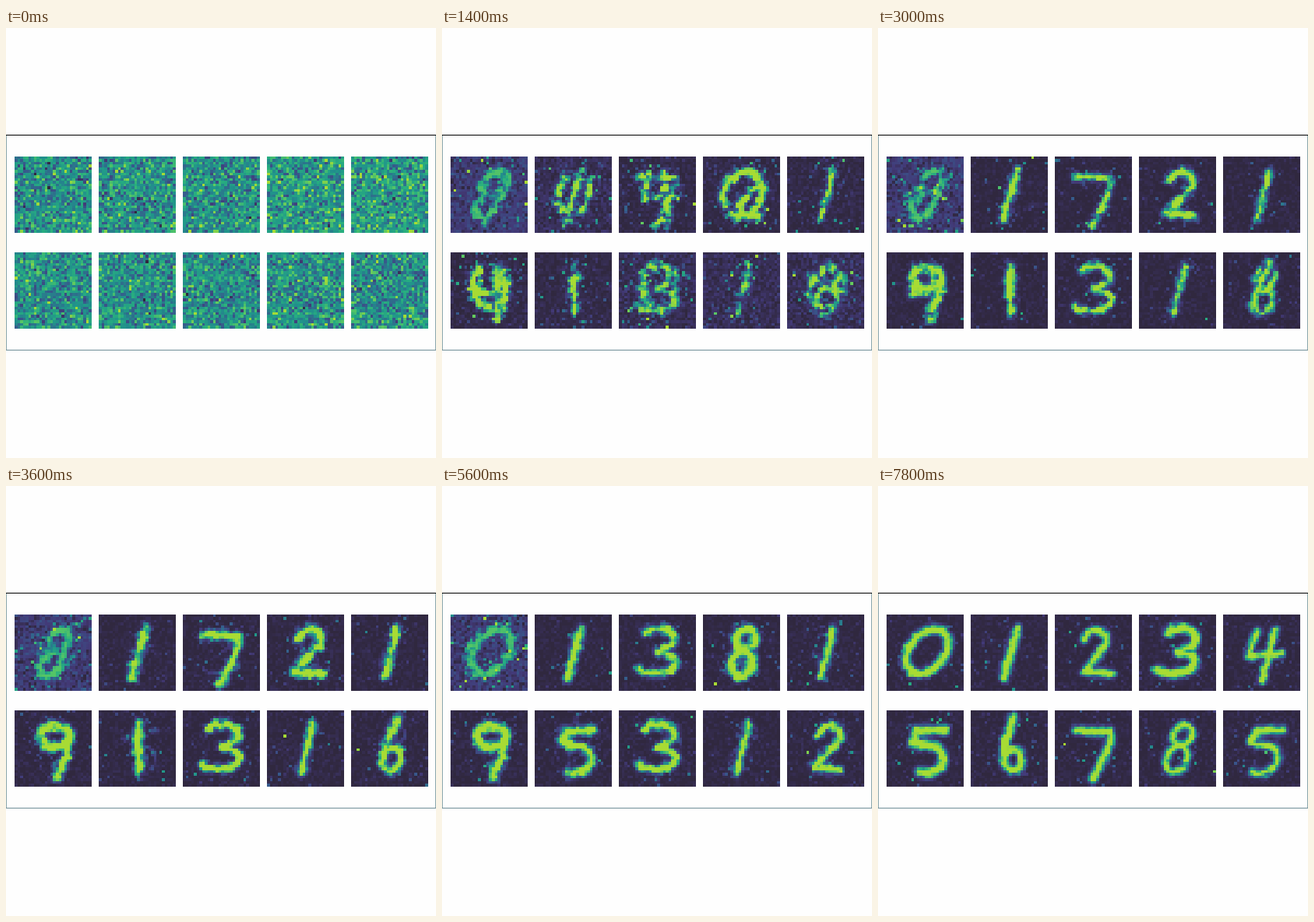
Animation of 552 by 552 pixels, one loop 8 s. Source, as a matplotlib script:

```python
import numpy as np
import matplotlib.pyplot as plt
from matplotlib.animation import FuncAnimation
from matplotlib.colors import LinearSegmentedColormap
from matplotlib.patches import Rectangle

SIZE, FRAMES, STEP = 552, 40, 200
GRID, SIDE = 28, 98.2
KEYS = [3, 11, 18, 28, 35, 39]  # frames at which a pose is fully formed
SETTLED = 4                     # pose from which every panel is clean

# digits a panel passes through, slant, half line width
PANELS = [
    ("898000", 0.35, 5.0), ("u11111", 0.28, 5.0), ("477322", 0.00, 4.6),
    ("022833", 0.10, 5.7), ("111144", 0.25, 4.1), ("u49955", 0.00, 5.7),
    ("111566", 0.00, 4.8), ("u33377", 0.00, 5.0), ("111188", 0.22, 4.1),
    ("u86295", 0.15, 4.3)]
HAZY = {0, 1, 7, 8, 9}

cmap = LinearSegmentedColormap.from_list("digits", [
    (0.0, "#30283f"), (0.12, "#433a78"), (0.3, "#375b8d"), (0.5, "#21918c"),
    (0.65, "#28ae80"), (0.8, "#5ec962"), (0.92, "#a5db36"), (1.0, "#a8db34")])

centres = (np.arange(GRID) + 0.5) * SIDE / GRID
gx, gy = np.meshgrid(centres, centres)


def arc(cx, cy, rx, ry, start=0, end=360):
    a = np.radians(np.linspace(start, end, 17))
    return list(zip(cx + rx * np.cos(a), cy + ry * np.sin(a)))


# upright strokes, in pixels inside a panel
DIGITS = {
    "0": [arc(51, 48, 25, 29)],
    "1": [[(51, 18), (51, 80)]],
    "2": [arc(52, 34, 14, 14, 190, 380) + [(38, 74), (72, 77)]],
    "3": [arc(50, 32, 20, 14, 220, 430), arc(46, 62, 26, 14, 280, 500)],
    "4": [[(37, 22), (33, 54), (74, 50)], [(59, 20), (59, 86)]],
    "5": [[(74, 26), (40, 26), (34, 42)] + arc(50, 63, 22, 18, -90, 110)],
    "6": [[(54, 10), (43, 48)] + arc(54, 64, 11, 14, 180, 540)],
    "7": [[(28, 26), (70, 28), (71, 40), (62, 62), (48, 88)]],
    "8": [arc(52, 32, 12, 13), arc(51, 63, 13, 17)],
    "9": [arc(52, 34, 17, 14) + [(69, 34), (64, 60), (54, 86)]],
    "u": [[(33, 28), (29, 46), (38, 68), (52, 72)], [(66, 28), (70, 46), (65, 72)]],
}


def stroke_dist(points):
    best = np.full((GRID, GRID), 99.0)
    for (x0, y0), (x1, y1) in zip(points[:-1], points[1:]):
        dx, dy = x1 - x0, y1 - y0
        length2 = max(dx * dx + dy * dy, 1e-9)
        t = np.clip(((gx - x0) * dx + (gy - y0) * dy) / length2, 0, 1)
        best = np.minimum(best, np.hypot(gx - x0 - t * dx, gy - y0 - t * dy))
    return best


def digit_dist(name, slant, width):
    lean = [[(x + slant * (49 - y), y) for x, y in s] for s in DIGITS[name]]
    return np.min([stroke_dist(s) for s in lean], axis=0) - width


def pose_style(panel, pose):
    """Brightness, background haze, edge roughness and share of stray dots."""
    first = pose == 0
    if panel == 0 and pose < SETTLED:
        return 0.72, 0.12, 2.4, 0.12
    if first:
        return (0.82, 0.09, 3.2, 0.17) if panel in HAZY else (1.0, 0.03, 2.8, 0.15)
    return 1.0, 0.015, 1.9 - 0.2 * pose, 0.05


dist = np.array([[digit_dist(c, slant, w) for c in path] for path, slant, w in PANELS])
style = np.array([[pose_style(n, k) for k in range(len(KEYS))] for n in range(10)])


def lumps(r):
    """Unit noise whose neighbouring cells are alike."""
    n = r.normal(size=(GRID, GRID))
    n = (n + np.roll(n, 1, 0)) / 2
    return n + np.roll(n, 1, 1)


rng = np.random.default_rng(7)
shared = rng.normal(size=(GRID, GRID))
own = np.array([lumps(rng) for _ in range(10)])
start = [0.52 + 0.05 * (n in (3, 4)) + 0.1 * shared
         + 0.13 * rng.normal(size=shared.shape) for n in range(10)]


def blend(panel, frame):
    """Grow the next digit while the last one thins out."""
    k = int(np.clip(np.searchsorted(KEYS, frame, "right") - 1, 0, len(KEYS) - 2))
    s = np.clip((frame - KEYS[k]) / (KEYS[k + 1] - KEYS[k]), 0, 1)
    s = s * s * (3 - 2 * s)
    d = np.minimum(dist[panel, k] + 7 * s, dist[panel, k + 1] + 7 * (1 - s))
    return d - 8 * s * (1 - s), (1 - s) * style[panel, k] + s * style[panel, k + 1]


def picture(panel, frame):
    r = np.random.default_rng(1000 + 10 * frame + panel)
    d, (peak, haze, rough, spike) = blend(panel, frame)
    jitter = 0.75 * own[panel] + 0.65 * lumps(r)
    ink = 1.08 * peak / (1 + np.exp(-(rough * jitter - d) / 1.5))
    ground = haze + (0.015 + 0.4 * haze) * r.normal(size=d.shape)
    chance = spike * (0.6 + 2.4 * np.exp(-np.maximum(d, 0) / 9))
    size = r.exponential(0.1 + 0.9 * spike, d.shape)
    dots = (r.random(d.shape) < chance) * np.minimum(size, 1)
    img = np.maximum(ink, np.maximum(ground, 0) + dots)
    if frame < KEYS[0]:
        s = (frame / KEYS[0]) ** 0.6
        img = (1 - s) * start[panel] + s * img
    return np.clip(img, 0, 1)


fig = plt.figure(figsize=(SIZE / 100, SIZE / 100), dpi=100, facecolor="#fefefe")
ax = fig.add_axes([0, 0, 1, 1])
ax.axis("off")

images = []
for n in range(10):
    left = 10.8 + 108.15 * (n % 5)
    top = 165.6 + 122.6 * (n // 5)
    images.append(ax.imshow(
        picture(n, 0), cmap=cmap, vmin=0, vmax=1, interpolation="nearest",
        aspect="auto", extent=(left, left + SIDE, top + SIDE - 0.4, top)))


def bar(x, y, w, h, color):
    ax.add_patch(Rectangle((x, y), w, h, fc=color, lw=0, antialiased=False))


bar(0, 137, 1, 277, "#8ba6ac")
bar(551, 137, 1, 277, "#8ba6ac")
bar(0, 413, SIZE, 1, "#708f98")
bar(0, 137, SIZE, 1, "#000000")
ax.set_xlim(0, SIZE)
ax.set_ylim(SIZE, 0)


def update(frame):
    for n, im in enumerate(images):
        im.set_data(picture(n, frame))
    return images


anim = FuncAnimation(fig, update, frames=FRAMES, interval=STEP,
                     repeat=True, repeat_delay=0, blit=False)
plt.show()
```
